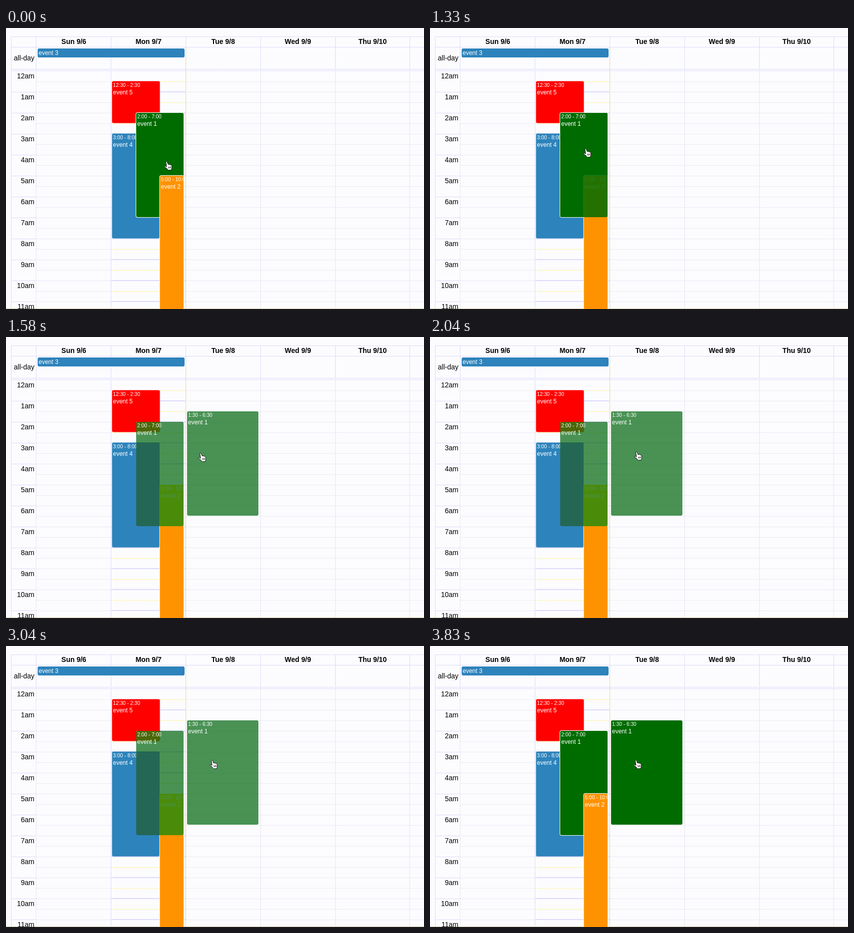
These frames come from a looping animation (838x563 px, 3.87 s). An HTML page with a canvas:

```html
<!DOCTYPE html>
<html lang="en">
<head>
<meta charset="utf-8">
<title>Calendar drag</title>
<style>
  html, body { margin: 0; width: 100%; height: 100%; overflow: hidden; background: #fcfcff; }
  canvas { display: block; }
</style>
</head>
<body>
<canvas id="stage" width="838" height="563"></canvas>
<script>
const ctx = document.getElementById('stage').getContext('2d');
const LOOP = 3870;
const FONT = '"Liberation Sans", Arial, sans-serif';
const LINE = '#dcdafa', DOT = '#d9d9e4', YELLOW = '#f6f07a', OLIVE = '#dcdca4';
const GREEN = '#006c00', GHOST = '#00680f', BLUE = '#2d83bb';
const COLUMNS = [60, 210, 360, 510, 660, 809];
const DAYS = ['Sun 9/6', 'Mon 9/7', 'Tue 9/8', 'Wed 9/9', 'Thu 9/10'];
const BODY_TOP = 86, HOUR = 42, SLOT = HOUR / 2;

// "shade" is the tone that shows through the translucent event 1
const event1 = { x: 261, y: 170, w: 95, h: 209, color: GREEN, time: '2:00 - 7:00', title: 'event 1', outline: true };
const event2 = { x: 308.5, y: 296, w: 47.5, h: 290, color: '#ff9200', shade: '#ffe300', time: '5:00 - 10:00', title: 'event 2', outline: true };
const event3 = { x: 63.5, y: 41, w: 294.5, h: 18, color: BLUE, title: 'event 3' };
const event4 = { x: 212.5, y: 211.5, w: 95.5, h: 210, color: BLUE, shade: '#7c67ff', time: '3:00 - 8:00', title: 'event 4' };
const event5 = { x: 212.5, y: 106.5, w: 96, h: 84, color: '#ff0000', shade: '#ff6700', time: '12:30 - 2:30', title: 'event 5' };

// Opacity of event 1 below and above event 2, and of the copy, from each time on
const PHASES = [
  { from: 0, base: 1, top: 0, copy: 0 },
  { from: 1330, base: 1, top: 0.86, copy: 0 },
  { from: 1420, base: 0, top: 0.71, copy: 0.71, ghost: true, shaded: true },
  { from: 3170, base: 1, top: 0.67, copy: 1, shaded: true, noCursor: true },
  { from: 3210, base: 1, top: 0, copy: 1 }
];

// Pointer tip: [time, x, y]
const POINTER = [
  [0, 320.5, 267.5], [600, 310.5, 241.5], [1420, 310.5, 241.5],
  [1840, 412.5, 229.5], [2700, 412.5, 229.5], [3300, 411.5, 228.5], [LOOP, 411.5, 228.5]
];
const GRAB_SLOT = slotAt(POINTER[2][2]);
const hand = new Path2D('M0 .8Q1.6-.6 2.7 1.2L4.6 6.2Q6 5 7.2 6.4Q8.6 5.5 9.5 7Q11.4 6.4 11.8 8.5L12.2 12.2L11 16.8L4.8 17.6L2 14L-2.6 11.1Q-3.2 9.2-1.2 9.3L1.6 10.7Z');
const knuckles = new Path2D('M5.2 10.5L5.8 14M7.5 10.2L8 13.8M9.7 9.9L10 13.4');

function slotAt(y) {
  return Math.floor((y - BODY_TOP) / SLOT);
}

function clock(slot) {
  return `${Math.floor(slot / 2)}:${slot % 2 ? '30' : '00'}`;
}

function line(x1, y1, x2, y2, color, dash = [], width = 1) {
  ctx.strokeStyle = color;
  ctx.lineWidth = width;
  ctx.setLineDash(dash);
  ctx.beginPath();
  ctx.moveTo(x1 + 0.5, y1 + 0.5);
  ctx.lineTo(x2 + 0.5, y2 + 0.5);
  ctx.stroke();
  ctx.setLineDash([]);
}

function text(value, x, y, size, color, align = 'left', weight = 'normal') {
  ctx.font = `${weight} ${size}px ${FONT}`;
  ctx.fillStyle = color;
  ctx.textAlign = align;
  ctx.fillText(value, x, y);
}

function drawGrid() {
  ctx.fillStyle = '#fcfcff';
  ctx.fillRect(0, 0, 838, 563);
  for (let slot = 1; slot < 23; slot++) {
    const y = BODY_TOP + slot * SLOT;
    const isHour = slot % 2 === 0;
    line(60, y, 210, y, DOT, [1, 1]);
    line(360, y, 838, y, DOT, [1, 1]);
    if (isHour) {
      line(10, y, 60, y, LINE);
      line(211, y - 0.5, 359, y - 0.5, LINE, [], 2);
    } else {
      line(211, y, 359, y, YELLOW, [2, 1]);
    }
  }
  for (const y of [17, 38, 82, 85]) line(10, y, 838, y, LINE);
  line(10, 17, 10, 563, LINE);
  COLUMNS.forEach((x, i) => {
    line(x, 17, x, 82, LINE);
    line(x, 85, x, 563, i === 1 ? LINE : DOT, i === 1 ? [] : [2, 1]);
  });
  line(360, 38, 360, 563, OLIVE);
  line(0, 562, 838, 562, '#d2ca9c');
  DAYS.forEach((day, i) => text(day, 136 + i * 149.7, 32, 14, '#000', 'center', 'bold'));
  text('all-day', 57, 65, 14, '#000', 'right');
  for (let hour = 0; hour < 12; hour++) {
    text(`${hour || 12}am`, 57, 101 + hour * HOUR, 14, '#000', 'right');
  }
}

function roundRect(x, y, w, h, radius, color) {
  ctx.fillStyle = color;
  ctx.beginPath();
  ctx.roundRect(x, y, w, h, radius);
  ctx.fill();
}

function clipTo(x, y, w, h) {
  ctx.beginPath();
  ctx.rect(x, y, w, h);
  ctx.clip();
}

function drawEvent(event, { alpha = 1, outline = event.outline, color = event.color, shaded = false } = {}) {
  if (!alpha) return;
  const { x, y, w, h, time, title } = event;
  ctx.save();
  ctx.globalAlpha = alpha;
  if (outline) roundRect(x - 1, y - 1, w + 2, h + 2, 4, '#fff');
  roundRect(x, y, w, h, 3, color);
  if (shaded) {
    ctx.save();
    clipTo(event1.x, event1.y, event1.w, event1.h);
    roundRect(x, y, w, h, 3, event.shade);
    ctx.restore();
  }
  clipTo(x + 1, y, w - 2, h);
  ctx.globalAlpha = 1;
  if (time) text(time, x + 2, y + 11, 10.2, '#fff');
  text(title, x + 2, y + (time ? 26 : 13), 12, '#fff');
  ctx.restore();
}

function pointerAt(t) {
  const next = POINTER.findIndex(key => key[0] > t);
  const [t0, x0, y0] = POINTER[next - 1];
  const [t1, x1, y1] = POINTER[next];
  const eased = 1 - (1 - (t - t0) / (t1 - t0)) ** 3;
  return { x: x0 + (x1 - x0) * eased, y: y0 + (y1 - y0) * eased };
}

// The dragged copy snaps to the day and half hour under the pointer
function copyAt({ x, y }) {
  const column = COLUMNS.findLast(left => left <= x);
  const slot = 4 + slotAt(y) - GRAB_SLOT;
  return {
    x: column + 3, y: BODY_TOP + slot * SLOT, w: 143, h: 209,
    time: `${clock(slot)} - ${clock(slot + 10)}`, title: 'event 1'
  };
}

function drawPointer({ x, y }) {
  ctx.save();
  ctx.translate(x, y);
  ctx.fillStyle = '#fff';
  ctx.strokeStyle = '#111';
  ctx.lineWidth = 1;
  ctx.lineJoin = 'round';
  ctx.fill(hand);
  ctx.stroke(hand);
  ctx.stroke(knuckles);
  ctx.restore();
}

function frame(now) {
  const t = now % LOOP;
  const phase = PHASES.findLast(p => t >= p.from);
  const { shaded } = phase;
  const color = phase.ghost ? GHOST : GREEN;
  const pointer = pointerAt(t);
  drawGrid();
  drawEvent(event3);
  drawEvent(event5, { shaded });
  drawEvent(event4, { shaded });
  drawEvent(event1, { alpha: phase.base });
  drawEvent(event2, { shaded });
  drawEvent(event1, { alpha: phase.top, outline: false, color });
  drawEvent(copyAt(pointer), { alpha: phase.copy, color });
  if (!phase.noCursor) drawPointer(pointer);
}

const start = performance.now();
function tick() {
  frame(performance.now() - start);
  requestAnimationFrame(tick);
}
tick();
</script>
</body>
</html>
```
